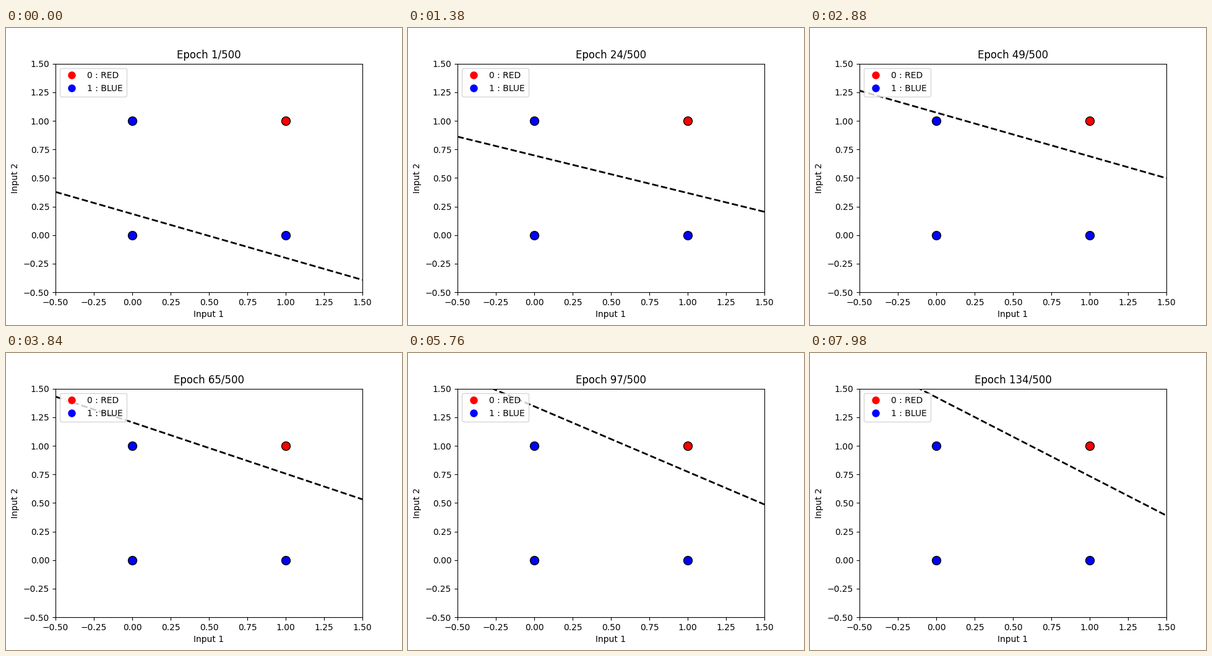
A matplotlib script that plays this animation: 640 by 480 pixels, repeating every 8 s.

```python
import numpy as np
import matplotlib.pyplot as plt
from matplotlib.animation import FuncAnimation
from matplotlib.lines import Line2D

TICK_MS = 20
LOOP_MS = 8000
EPOCH_MS = 60
EPOCHS = 500
LOW, HIGH = -0.5, 1.5

# Height of the decision boundary at both plot edges for a few epochs
KNOTS = np.array([1, 14, 35, 65, 83, 111, 134], float)
LEFT = np.array([0.378, 0.656, 1.065, 1.430, 1.557, 1.690, 1.769])
RIGHT = np.array([-0.391, -0.017, 0.383, 0.532, 0.516, 0.451, 0.390])


def hermite(x, knots, values):
    """Smooth cubic curve through the given points."""
    slopes = np.gradient(values, knots, edge_order=2)
    i = min(np.searchsorted(knots, x, side="right") - 1, len(knots) - 2)
    h = knots[i + 1] - knots[i]
    t = (x - knots[i]) / h
    return ((1 + 2 * t) * (1 - t) ** 2 * values[i]
            + t * (1 - t) ** 2 * h * slopes[i]
            + t * t * (3 - 2 * t) * values[i + 1]
            + t * t * (t - 1) * h * slopes[i + 1])


def legend_dot(color, label):
    return Line2D([0], [0], marker="o", color="w", markerfacecolor=color,
                  markersize=10, label=label)


fig, ax = plt.subplots(figsize=(6.4, 4.8), dpi=100)
ax.set_xlim(LOW, HIGH)
ax.set_ylim(LOW, HIGH)
ax.set_xlabel("Input 1")
ax.set_ylabel("Input 2")

# NAND truth table
for a in (0, 1):
    for b in (0, 1):
        ax.plot(a, b, "o", color="red" if a and b else "blue",
                markersize=10, markeredgecolor="black")

boundary, = ax.plot([], [], "k--", linewidth=2)
title = ax.set_title("")
ax.legend(handles=[legend_dot("red", "0 : RED"),
                   legend_dot("blue", "1 : BLUE")], loc="upper left")


def update(tick):
    epoch = tick * TICK_MS // EPOCH_MS + 1
    boundary.set_data([LOW, HIGH], [hermite(epoch, KNOTS, LEFT),
                                    hermite(epoch, KNOTS, RIGHT)])
    title.set_text(f"Epoch {epoch}/{EPOCHS}")
    return boundary, title


anim = FuncAnimation(fig, update, frames=LOOP_MS // TICK_MS,
                     init_func=lambda: update(0), interval=TICK_MS,
                     repeat=True, repeat_delay=0, blit=False)
plt.show()
```
